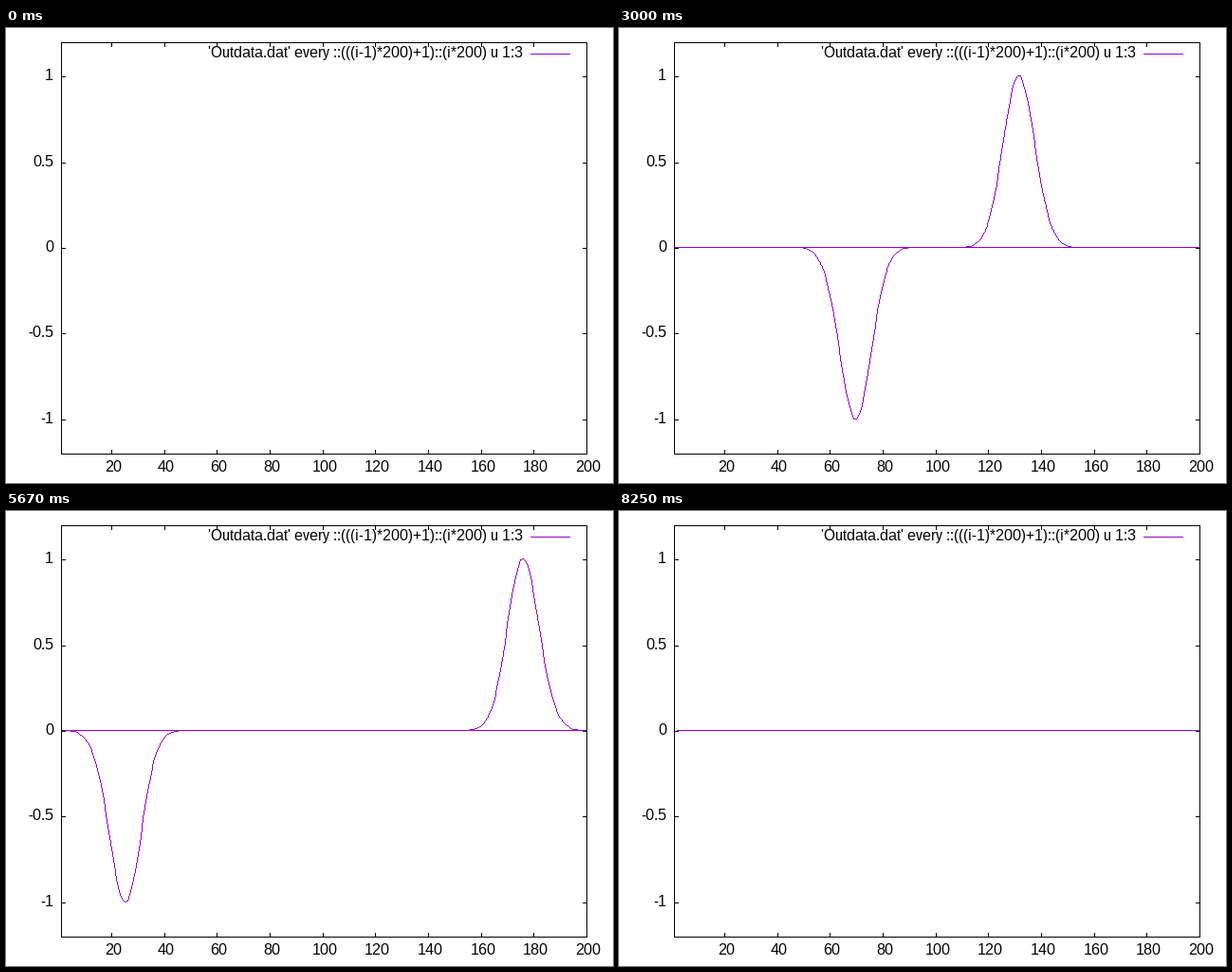
Write a matplotlib script that moves like this. It is 640 by 480 pixels and loops after 8.28 s.

```python
import numpy as np
import matplotlib.pyplot as plt
from matplotlib.animation import FuncAnimation

# Whole-pixel glyph advances, as in a plain bitmap plot.
plt.rcParams["text.hinting"] = "default"
plt.rcParams["text.hinting_factor"] = 1

W, H, DPI = 640, 480, 100
FRAMES, INTERVAL = 276, 30
LEFT, RIGHT, TOP, BOTTOM = 58, 612, 15, 449
CELLS, SOURCE = 200, 101
PEAK_TIME, SPREAD = 40, 12
PX = 72 / DPI
TICK = 4
PURPLE = "#9400d3"


def simulate(steps):
    """Magnetic field of a 1D FDTD pulse with absorbing ends, step after step."""
    ex = np.zeros(CELLS + 1)
    hy = np.zeros(CELLS + 1)
    low, high = [0.0, 0.0], [0.0, 0.0]
    rows = []
    for t in range(1, steps + 1):
        ex[2:] += 0.5 * (hy[1:-1] - hy[2:])
        ex[SOURCE] += np.exp(-0.5 * ((PEAK_TIME - t) / SPREAD) ** 2)
        ex[1] = low.pop(0)
        low.append(ex[2])
        ex[CELLS] = high.pop(0)
        high.append(ex[CELLS - 1])
        hy[1:-1] += 0.5 * (ex[1:-1] - ex[2:])
        rows.append(hy[1:].copy())
    return np.concatenate(rows)


def to_x(v):
    return np.floor(LEFT + (np.asarray(v) - 1) * (RIGHT - LEFT) / (CELLS - 1) + 0.5)


def to_y(v):
    return BOTTOM - np.floor((np.asarray(v) + 1.2) * (BOTTOM - TOP) / 2.4 + 0.5)


def raster(xs, ys):
    """Pixels of a one-pixel polyline through whole-pixel vertices."""
    px, py = [], []
    for x0, y0, x1, y1 in zip(xs[:-1], ys[:-1], xs[1:], ys[1:]):
        n = int(max(abs(x1 - x0), abs(y1 - y0))) + 1
        px.append(np.round(np.linspace(x0, x1, n)))
        py.append(np.round(np.linspace(y0, y1, n)))
    # A quarter pixel keeps the marker snapping away from ties.
    return np.concatenate(px) + 0.25, np.concatenate(py) + 0.25


fig = plt.figure(figsize=(W / DPI, H / DPI), dpi=DPI, facecolor="white")
ax = fig.add_axes([0, 0, 1, 1])
ax.set_xlim(0, W)
ax.set_ylim(H, 0)
ax.axis("off")


def bar(x0, y0, x1, y1, color="black", z=1):
    """Filled run of pixels, both ends included."""
    ax.add_patch(plt.Rectangle((x0, y0), x1 - x0 + 1, y1 - y0 + 1, fc=color,
                               lw=0, antialiased=False, zorder=z))


def label(x, y, text, align):
    ax.text(x, y, text, ha=align, va="baseline", family="Liberation Sans",
            size=16 * PX, color="black", zorder=4)


for v in range(20, CELLS + 1, 20):
    x = int(to_x(v))
    bar(x, TOP, x, TOP + TICK)
    bar(x, BOTTOM - TICK, x, BOTTOM)
    label(x + 1.8, 468, str(v), "center")

for v in (-1, -0.5, 0, 0.5, 1):
    y = int(to_y(v))
    bar(LEFT, y, LEFT + TICK, y)
    bar(RIGHT - TICK, y, RIGHT, y)
    label(50, y + 4, f"{v:g}", "right")

for y in (TOP, BOTTOM):
    bar(LEFT, y, RIGHT, y, z=3)
for x in (LEFT, RIGHT):
    bar(x, TOP, x, BOTTOM, z=3)

label(545, 31, "'Outdata.dat' every ::(((i-1)*200)+1)::(i*200) u 1:3", "right")
bar(553, 27, 594, 27, PURPLE)

curve, = ax.plot([], [], ",", color=PURPLE, zorder=2)
series = simulate(FRAMES)
cells = to_x(np.append(np.arange(2, CELLS + 1), 1))


def update(i):
    if i == 0:
        curve.set_data([], [])
    else:
        # Each slice runs one value into the next step, drawing the return line.
        start = i * CELLS + 1
        values = series[start:start + CELLS]
        curve.set_data(*raster(cells[:len(values)], to_y(values)))
    return curve,


anim = FuncAnimation(fig, update, frames=FRAMES, interval=INTERVAL,
                     init_func=lambda: update(0), repeat=True, repeat_delay=0)
plt.show()
```
